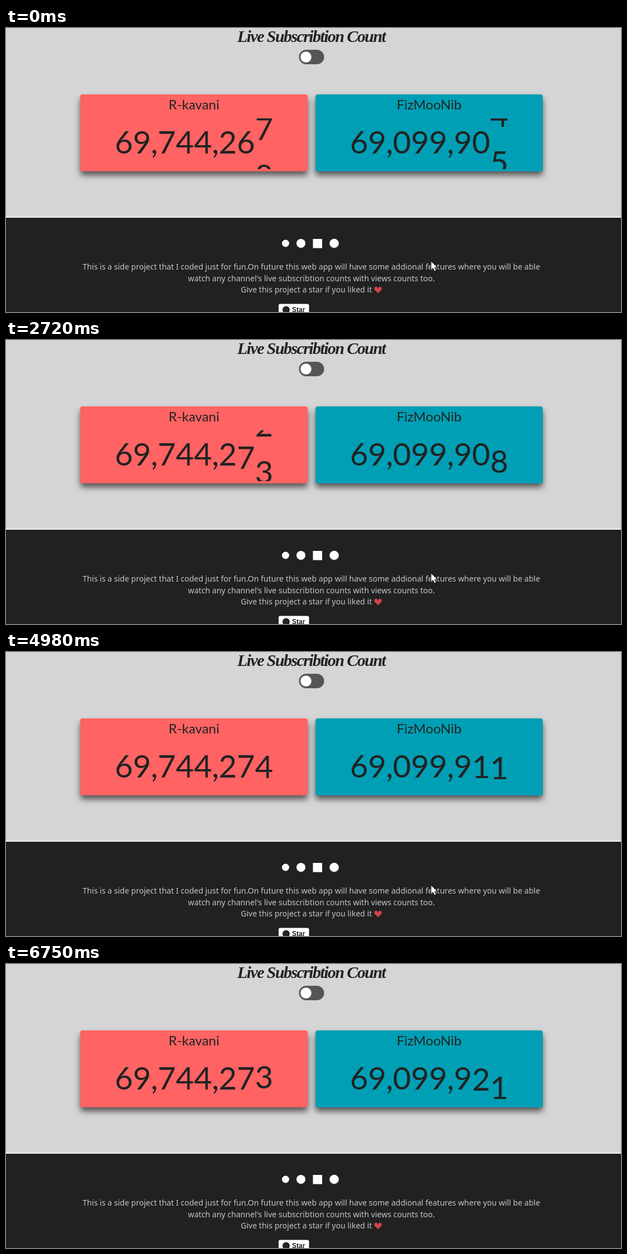
Recreate the animation shown at these times as an HTML page. Size 1101x509 px, loop 8 s.

```html
<!DOCTYPE html>
<html lang="en">
<head>
<meta charset="utf-8">
<title>Live counter</title>
<style>
  html, body { margin: 0; width: 100%; height: 100%; overflow: hidden; background: #d5d5d5; }
  .card {
    position: absolute; top: 119px; width: 407px; height: 138px; border-radius: 4px;
    box-shadow: 0 7px 11px rgba(0,0,0,.6);
  }
  .red { left: 133px; background: #ff6363; }
  .teal { left: 554px; background: #009fb5; }
  svg { position: absolute; left: 0; top: 0; display: block; }
  text { text-anchor: middle; fill: #222; }
  .heading { font: italic bold 30px "Liberation Serif", serif; letter-spacing: -1.6px; }
  .name { font: 24px Lato, sans-serif; }
  .digits text { font: 56px Lato, sans-serif; }
  .note text { font: 14.08px "Noto Sans", sans-serif; fill: #c6c6c6; }
  .star { font: bold 12px "Liberation Sans", sans-serif; text-anchor: start; }
</style>
</head>
<body>
<div class="card red"></div>
<div class="card teal"></div>
<svg width="1101" height="509" viewBox="0 0 1101 509">
  <defs><clipPath id="window"><rect x="140" y="162" width="820" height="91"/></clipPath></defs>

  <text class="heading" x="546.5" y="25">Live Subscribtion Count</text>
  <rect x="524.5" y="39" width="45" height="26" rx="13" fill="#555"/>
  <circle cx="537" cy="52" r="9.8" fill="#fff"/>

  <text class="name" x="336.5" y="146">R-kavani</text>
  <text class="name" x="757.5" y="146">FizMooNib</text>
  <g class="digits" id="digits" clip-path="url(#window)"></g>

  <rect y="338.5" width="1101" height="1.5" fill="#fff"/>
  <rect y="340" width="1101" height="169" fill="#212121"/>
  <g fill="#fff">
    <circle cx="500.5" cy="386" r="6.5"/>
    <circle cx="528" cy="386" r="8"/>
    <rect x="549.5" y="378" width="16.5" height="16.5"/>
    <circle cx="587.5" cy="386" r="8.3"/>
  </g>
  <g class="note">
    <text x="546.7" y="433">This is a side project that I coded just for fun.On future this web app will have some addional features where you will be able</text>
    <text x="546.7" y="454">watch any channel's live subscribtion counts with views counts too.</text>
    <text x="420.2" y="474" style="text-anchor:start">Give this project a star if you liked it</text>
  </g>
  <path d="M666 475.5L660.6 470C657.5 466.5 660 463.8 662.5 463.8Q664.8 463.8 666 466Q667.2 463.8 669.5 463.8C672 463.8 674.5 466.5 671.4 470Z" fill="#cb444b"/>
  <rect x="488" y="494.5" width="54.5" height="20" rx="3" fill="#fff"/>
  <circle cx="501.5" cy="505" r="6.5" fill="#222"/>
  <text class="star" x="512" y="509">Star</text>

  <path id="cursor" d="M0 0V15.5L3.6 12.2L6 17.8L8.6 16.7L6.2 11.2H11Z" fill="#fff" stroke="#222" stroke-width=".8"/>
</svg>
<script>
const LOOP = 8000, STEP = 135, LAST = 6750;
const PITCH = 84, BASE = 225, ADVANCE = 32.48, COMMA = 11.8;

// Counter values rolled to by each update; the first row is the initial state
const updates = [
  { red: 69744267, blue: 69099904 },
  { start: -301, length: 1543, red: 69744268, blue: 69099906 },
  { start: 1457, length: 1870, red: 69744273, blue: 69099908 },
  { start: 3262, length: 2000, red: 69744274, blue: 69099911 },
  { start: 5205, length: 1896, red: 69744273, blue: 69099921 }
];

const layer = document.getElementById("digits");
const cursor = document.getElementById("cursor");
const clamp = v => Math.min(1, Math.max(0, v));
const mix = (a, b, p) => a + (b - a) * p;

function addText(x, y, label) {
  const el = document.createElementNS("http://www.w3.org/2000/svg", "text");
  el.setAttribute("x", x);
  el.setAttribute("y", y);
  el.textContent = label;
  return layer.appendChild(el);
}

function buildCounter(unitsX) {
  const columns = [];
  for (let k = 0; k < 8; k++) {
    const x = unitsX - k * ADVANCE - Math.floor(k / 3) * COMMA;
    columns.push([addText(x, BASE, ""), addText(x, BASE, "")]);
    if (k === 2 || k === 5) addText(x - (ADVANCE + COMMA) / 2, BASE, ",");
  }
  return columns;
}
const counters = { red: buildCounter(462), blue: buildCounter(883) };

// cubic-bezier(.25, .1, .25, 1)
function ease(x) {
  let lo = 0, hi = 1;
  for (let i = 0; i < 24; i++) {
    const s = (lo + hi) / 2;
    if (0.75 * s * (1 - s) + s ** 3 < x) lo = s; else hi = s;
  }
  const r = 1 - lo;
  return 0.3 * r * r * lo + 3 * r * lo * lo + lo ** 3;
}

// Every column rolls from its old digit to its new one
function drawCounter(columns, from, to, p) {
  columns.forEach((pair, k) => {
    const unit = 10 ** k;
    const pos = mix(Math.floor(from / unit), Math.floor(to / unit), p);
    const first = Math.floor(pos);
    pair.forEach((el, i) => {
      el.textContent = (first + i) % 10;
      el.setAttribute("y", BASE + (first + i - pos) * PITCH);
    });
  });
}

// The cursor glides to a resting place, then leaves the stage
function drawCursor(t) {
  const a = clamp((t - 5180) / 280), b = clamp((t - 5850) / 360);
  const x = mix(mix(761, 923, a), 1035, b), y = mix(mix(418, 472, a), 514, b);
  cursor.setAttribute("transform", `translate(${x} ${y})`);
}

function draw(time) {
  const t = Math.min(LAST, Math.floor((time + 40) / STEP) * STEP);
  const i = updates.findLastIndex(u => u.start <= t);
  const from = updates[i - 1], to = updates[i];
  const p = ease(clamp((t - to.start) / to.length));
  for (const key in counters) drawCounter(counters[key], from[key], to[key], p);
  drawCursor(t);
}

const origin = performance.now();
function tick() {
  draw((performance.now() - origin) % LOOP);
  requestAnimationFrame(tick);
}
tick();
</script>
</body>
</html>
```
